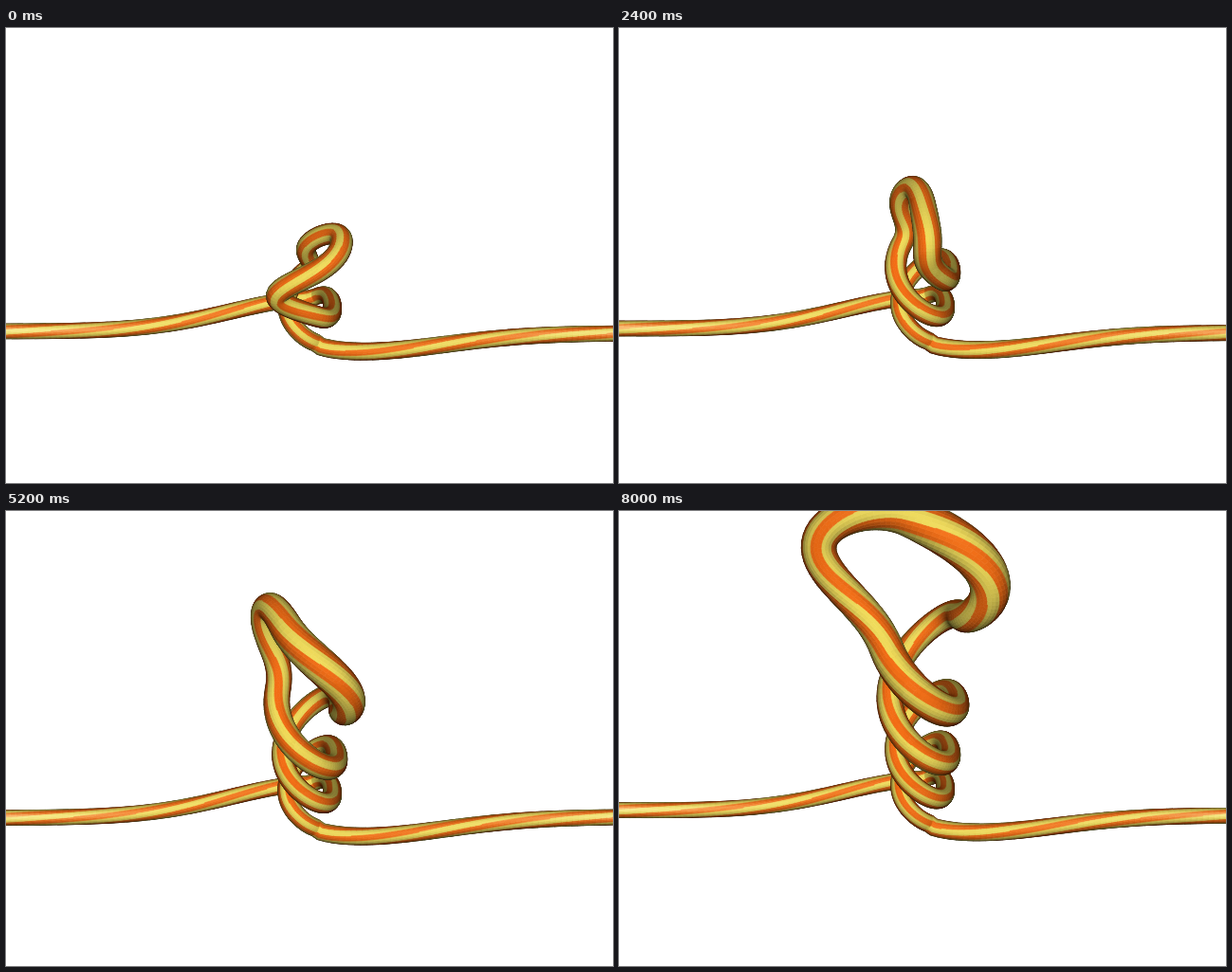
Recreate the animation shown at these times as an HTML page with a canvas. Size 640 by 480 pixels, loop 8.1 s.

```html
<!DOCTYPE html>
<html>
<head>
<meta charset="utf-8">
<title>Twisting cord</title>
<style>
html, body { margin: 0; width: 100%; height: 100%; overflow: hidden; background: #fff; }
canvas { display: block; }
</style>
</head>
<body>
<canvas id="stage" width="640" height="480"></canvas>
<script>
const ctx = document.getElementById('stage').getContext('2d');
const { PI, sin, cos, exp, tanh, min, max } = Math;
const LOOP = 8100, STEP = 100;
const STRIPES = 10, PER_STRIPE = 3, SIDES = STRIPES * PER_STRIPE;
const CENTER = 320, COIL = 24, DEPTH = 360;

// Two strands wind up an axis that leans towards the viewer; u counts half turns.
// d is the way along a strand from the tip of the loop, side is 1 or -1.
function strandPoint(d, side, pose) {
  const { turn, edge } = pose;
  const unwound = d < 1 ? d ** 4 / 4 : d - 0.75;
  const top = d < 1 ? cos(PI * d / 2) ** 2 : 0;
  const swell = d < 1 ? sin(PI * d) ** 2 : 0;
  const angle = PI * (turn - unwound);
  const u = turn - unwound + 0.65 * top;
  const scale = 1 / (1 - 0.153 * u);
  const open = side * tanh(4 * d);
  const reach = COIL * open + 22 * side * swell;
  const lean = (40 * edge - 14) * top - 33 * edge * swell;
  const skew = 0.28 * COIL * (sin(angle) * open) ** 2;
  return [
    CENTER + scale * (reach * cos(angle) + skew + lean),
    293 - 207 * (scale - 1) + scale * (26 * open * sin(angle) - 8 * edge * top),
    55 * u + 20 * scale * open * sin(angle)
  ];
}

const bell = (x, mid, width) => exp(-(((x - mid) / width) ** 2));
const leftTail = x => [x, 320 - 35 * bell(x, 330, 130), -47 - 20 * (327 - x) / 327];
const rightTail = x => [
  x,
  322 + 20 * bell(x, 365, 135) - 6.5 * exp((325 - x) / 22),
  -7 - 55 * min(1, (x - 325) / 315)
];

function centerLine(time) {
  const phase = 0.5 + time / 3400;
  const edge = (1 - cos(2 * PI * phase)) / 2;      // 1 when the loop is seen edge-on
  const turn = phase + 0.12 + 0.18 * (1 - edge);
  const pose = { turn, edge };
  const end = turn + 1.25, count = Math.round(end / 0.025);
  const pts = [];
  for (let x = -24; x < 322; x += 6) pts.push(leftTail(x));
  for (let i = -count; i <= count; i++) {
    pts.push(strandPoint(Math.abs(i) / count * end, i < 0 ? 1 : -1, pose));
  }
  for (let x = 332; x < 670; x += 6) pts.push(rightTail(x));
  const sag = -5 * sin(2 * PI * time / 6000);
  return pts.map(([x, y, z]) => [x, y + sag * (0.6 - 0.4 * (x - CENTER) / CENTER), z]);
}

const dot = (a, b) => a[0] * b[0] + a[1] * b[1] + a[2] * b[2];
const sub = (a, b) => [a[0] - b[0], a[1] - b[1], a[2] - b[2]];
const unit = a => { const l = Math.hypot(...a) || 1; return a.map(v => v / l); };
const cross = (a, b) => [
  a[1] * b[2] - a[2] * b[1], a[2] * b[0] - a[0] * b[2], a[0] * b[1] - a[1] * b[0]
];

const light = unit([0, -0.12, 1]);
const yellow = [240, 219, 90], orange = [244, 110, 22], glow = [255, 250, 190];

function tint(base, normal, x, along) {
  const lit = max(0, dot(normal, light));
  const shade = 0.22 + 0.78 * lit ** 1.1;
  const far = Math.abs(x - CENTER) / CENTER;
  const gloss = 0.6 * lit ** 16 * along ** 4 * (0.15 + 0.85 * min(1, far * far));
  return `rgb(${base.map((v, c) => Math.round(v * shade * (1 - gloss) + glow[c] * gloss)).join()})`;
}

// Rings of surface points around the centre line, carried along without extra spin
function buildRings(pts, time) {
  let side = [0, -1, 0], length = 0;
  return pts.map((p, i) => {
    const prev = pts[max(0, i - 1)], next = pts[min(pts.length - 1, i + 1)];
    const dir = unit(sub(next, prev));
    const k = dot(side, dir);
    side = unit(side.map((v, c) => v - k * dir[c]));
    const other = cross(dir, side);
    length += Math.hypot(...sub(p, prev));
    const spin = 0.3 + 0.009 * length + PI * time / 3400;
    const radius = 9.3 / (1 - p[2] / DEPTH);
    const ring = [];
    for (let j = 0; j < SIDES; j++) {
      const a = spin + j * 2 * PI / SIDES, ca = cos(a), sa = sin(a);
      const normal = side.map((v, c) => v * ca + other[c] * sa);
      ring.push({ normal, at: p.map((v, c) => v + radius * normal[c]) });
    }
    return { ring, along: Math.abs(dir[0]) };
  });
}

function draw(time) {
  const rings = buildRings(centerLine(time), time);
  const faces = [];
  for (let i = 0; i + 1 < rings.length; i++) {
    const { ring, along } = rings[i], ahead = rings[i + 1].ring;
    for (let j = 0; j < SIDES; j++) {
      const j2 = (j + 1) % SIDES;
      const corners = [ring[j], ring[j2], ahead[j2], ahead[j]];
      const normal = unit([0, 1, 2].map(c => corners.reduce((s, q) => s + q.normal[c], 0)));
      if (normal[2] < -0.15) continue;
      const base = Math.floor(j / PER_STRIPE) % 2 ? orange : yellow;
      faces.push({
        corners,
        depth: corners.reduce((s, q) => s + q.at[2], 0),
        color: tint(base, normal, ring[j].at[0], along)
      });
    }
  }
  faces.sort((a, b) => a.depth - b.depth);
  ctx.fillStyle = '#fff';
  ctx.fillRect(0, 0, 640, 480);
  ctx.lineWidth = 0.7;
  ctx.lineJoin = 'round';
  for (const { corners, color } of faces) {
    ctx.beginPath();
    corners.forEach(q => ctx.lineTo(q.at[0], q.at[1]));
    ctx.closePath();
    ctx.fillStyle = ctx.strokeStyle = color;
    ctx.fill();
    ctx.stroke();
  }
}

const start = performance.now();
let shown = -1;
function tick() {
  const step = Math.floor((performance.now() - start) % LOOP / STEP);
  if (step !== shown) draw((shown = step) * STEP);
  requestAnimationFrame(tick);
}
tick();
</script>
</body>
</html>
```
